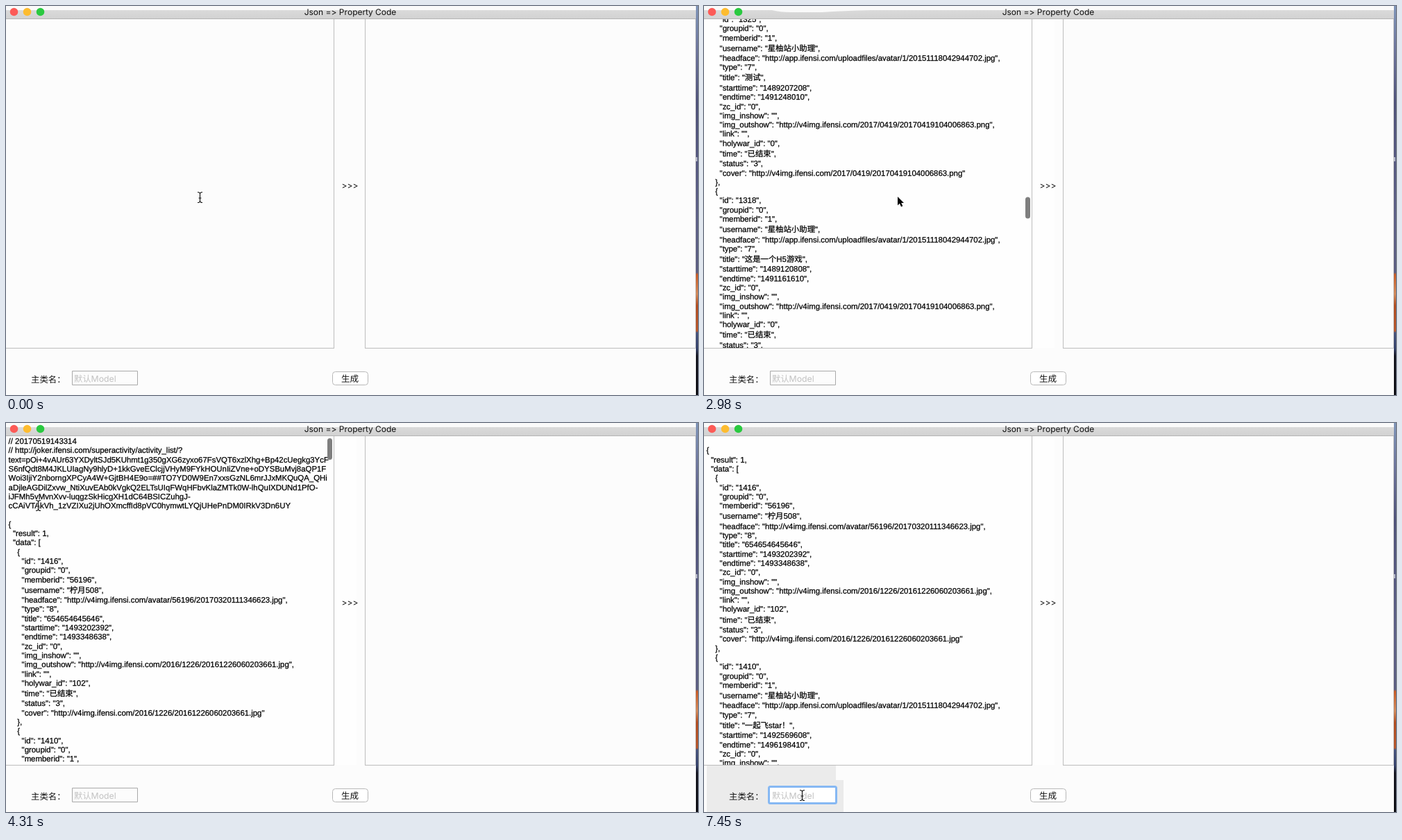
Write an HTML page with a canvas that moves like this. It is 997 px wide and 561 px high and loops after 8 s.

```html
<!DOCTYPE html>
<html lang="zh">
<head>
<meta charset="utf-8">
<title>Json => Property Code</title>
<style>
  html, body { margin: 0; width: 100%; height: 100%; overflow: hidden; background: #fcfcfc; }
  canvas { display: block; font-variant-ligatures: none; font-feature-settings: "calt" 0, "liga" 0; }
</style>
</head>
<body>
<canvas id="stage" width="997" height="561"></canvas>
<script>
const ctx = document.getElementById('stage').getContext('2d');
const LOOP = 8000, TICK = 149;
const LINE = 13.3, WIDE_EXTRA = 2.95, TOP = 20, BOTTOM = 493, LEFT = 3.6;
const HEADER_LINES = 8;
const CODE_FONT = '11.4px "Liberation Sans", "Noto Sans CJK SC", "Noto Sans CJK", sans-serif';
const uiFont = size => `${size}px Inter, "Noto Sans CJK SC", "Noto Sans CJK", sans-serif`;

// ---- Document -----------------------------------------------------------
const IMG = 'http://v4img.ifensi.com/';
const POSTER = IMG + '2017/0419/20170419104006863.png';

function activity(id, o) {
  return {
    id: String(id), groupid: '0', memberid: o.member, username: o.user, headface: o.face,
    type: o.type, title: o.title, starttime: o.start, endtime: o.end, zc_id: '0',
    img_inshow: '', img_outshow: o.image, link: o.link, holywar_id: o.war,
    time: o.time, status: o.status, cover: o.image
  };
}
function focus(title, linkid, image) {
  return {
    id: '1410', type: '7', zc_id: '0', img_outshow: POSTER, title,
    focustype: '40', linkid, focusimage: IMG + '2017/' + image + '.jpg'
  };
}

const helper = {
  member: '1', user: '星柚站小助理',
  face: 'http://app.ifensi.com/uploadfiles/avatar/1/20151118042944702.jpg',
  type: '7', title: '一起飞star！', start: '1492569608', end: '1496198410',
  image: POSTER, link: 'http://h5.ifensi.com/dev/idol/index.php?normal',
  war: '0', time: '12天后结束', status: '2'
};
const data = [
  activity(1416, {
    member: '56196', user: '柠月508', face: IMG + 'avatar/56196/20170320111346623.jpg',
    type: '8', title: '654654645646', start: '1493202392', end: '1493348638',
    image: IMG + '2016/1226/20161226060203661.jpg', link: '', war: '102',
    time: '已结束', status: '3'
  }),
  activity(1410, helper)
];
for (let i = 0; i < 20; i++) {
  data.push(activity(1402 - 7 * i, {
    ...helper, title: i % 2 ? '测试' : '这是一个H5游戏', link: '', time: '已结束', status: '3',
    start: String(1490157608 - i * 86400), end: String(1492198410 - i * 86400)
  }));
}
const GAME = 'http://h5.ifensi.com/dev/lightstar/web-mobile/game';
const focuses = [
  focus('测试', '1402', '0322/20170322030212415'),
  focus('测试', 'http://h5.ifensi.com/dev/wajtc/index.html,1402', '0322/20170322030451198'),
  focus('1111', '1410', '0505/20170505034627951'),
  focus('这是一个H5游戏', GAME + '.html?sid=1001,1400', '0505/20170505034700789'),
  focus('测试', GAME, '0509/20170509043902275')
];
const header = `// 20170519143314
// http://joker.ifensi.com/superactivity/activity_list/?
text=pOi+4vAUr63YXDyltSJd5KUhmt1g350gXG6zyxo67FsVQT6xzlXhg+Bp42cUegkg3YcF
S6nfQdt8M4JKLUIagNy9hlyD+1kkGveEClcjjVHyM9FYkHOUnIiZVne+oDYSBuMvj8aQP1F
Woi3IjiY2nborngXPCyA4W+GjtBH4E9o=##TO7YD0W9En7xxsGzNL6mrJJxMKQuQA_QHi
aDjleAGDilZxvw_NtiXuvEAb0kVgkQ2ELTsUIqFWqHFbvKlaZMTk0W-lhQuIXDUNd1PfO-
iJFMh5vMvnXvv-luqgzSkHicgXH1dC64BSICZuhgJ-
cCAiVTAkVh_1zVZIXu2jUhOXmcffId8pVC0hymwtLYQjUHePnDM0IRkV3Dn6UY

`;

let docHeight = 0;
const lines = (header + JSON.stringify({ result: 1, data, focus: focuses }, null, 2))
  .split('\n').map(text => {
    const wide = /[^\x00-\x7f]/.test(text);
    const line = { text, y: docHeight, baseline: docHeight + 10.1 + (wide ? 1.8 : 0) };
    docHeight += LINE + (wide ? WIDE_EXTRA : 0);
    return line;
  });
const maxScroll = docHeight - (BOTTOM - TOP);

// ---- Timeline, counted in ticks -------------------------------------------
const pointerPath = [
  [0, 279, 276], [20, 279, 276], [22, 227, 261], [25, 227, 261], [29, 46, 119],
  [31, 7, 30], [32, 6, 25], [36, 63, 127], [39, 63, 127], [44, 127, 553],
  [45, 128, 545], [47, 141, 537], [60, 141, 537]
];
function pointerAt(n) {
  const i = pointerPath.findIndex(p => p[0] > n);
  const [t0, x0, y0] = pointerPath[i - 1], [t1, x1, y1] = pointerPath[i];
  const k = (n - t0) / (t1 - t0);
  return { x: Math.round(x0 + (x1 - x0) * k), y: Math.round(y0 + (y1 - y0) * k) };
}
const scrollSteps = [maxScroll - 10, maxScroll * .92, maxScroll * .58, maxScroll * .2, 248, 70, 14];
const scrollAt = n => n < 18 ? maxScroll : scrollSteps[n - 18] || 0;
const within = (n, ...spans) => spans.some(([a, b]) => n >= a && n < b);

// ---- Drawing --------------------------------------------------------------
function rect(color, x, y, w, h) {
  ctx.fillStyle = color;
  ctx.fillRect(x, y, w, h);
}
function label(text, x, y, size, color = '#111', align = 'left') {
  ctx.font = uiFont(size);
  ctx.textAlign = align;
  ctx.fillStyle = color;
  ctx.fillText(text, x, y);
}
// Draws character by character, so that arrows do not turn into ligatures.
function plainLabel(text, centre, y, size) {
  ctx.font = uiFont(size);
  const widths = [...text].map(c => ctx.measureText(c).width);
  let x = centre - widths.reduce((a, b) => a + b) / 2;
  [...text].forEach((c, i) => {
    label(c, x, y, size);
    x += widths[i];
  });
}
function roundBox(x, y, w, h, r, fill, stroke, width = 1) {
  ctx.beginPath();
  ctx.roundRect(x, y, w, h, r);
  ctx.fillStyle = fill;
  ctx.fill();
  if (!stroke) return;
  ctx.strokeStyle = stroke;
  ctx.lineWidth = width;
  ctx.stroke();
}

function drawTitleBar(n) {
  const shade = ctx.createLinearGradient(0, 0, 0, 18);
  shade.addColorStop(0, '#dedede');
  shade.addColorStop(1, '#d2d2d2');
  rect(shade, 0, 0, 994, 18);
  const glare = new Path2D(
    within(n, [1, 18]) ? 'M0 0V6H88Q110 10 140 10T215 12Q228 10 240 6H994V0Z'
    : within(n, [18, 21]) ? 'M0 0V6H98Q110 9 125 9H170Q200 7 240 6H994V0Z'
    : 'M0 0H994V6H0Z');
  ctx.fillStyle = '#fafafa';
  ctx.fill(glare);
  rect('#b4b4b4', 0, 18, 994, 1);
  ['#fc5b57', '#fdbc30', '#2ac940'].forEach((color, i) => {
    ctx.beginPath();
    ctx.arc(11.5 + 19 * i, 8.5, 5.8, 0, 7);
    ctx.fillStyle = color;
    ctx.fill();
  });
  plainLabel('Json => Property Code', 496, 13, 12);
}

function drawDesktopEdge() {
  const edge = ctx.createLinearGradient(0, 0, 0, 561);
  [[0, '#7f95b8'], [.12, '#6b7299'], [.25, '#4d5078'], [.55, '#5c5f86'], [.685, '#5a5c80'],
   [.69, '#c65a25'], [.74, '#d08a5c'], [.77, '#b04c20'], [.835, '#b5562c'], [.84, '#45527c'],
   [.88, '#33406a'], [.9, '#14151f'], [1, '#0c0c12']]
    .forEach(([at, color]) => edge.addColorStop(at, color));
  rect(edge, 994, 0, 3, 561);
  rect('#b9bccb', 994, 218, 2, 6);
}

function drawSelection(pointer) {
  const row = Math.floor((pointer.y - TOP) / LINE);
  rect('#b3d7ff', 3, TOP, 467, row * LINE);
  if (row < HEADER_LINES) rect('#b3d7ff', 3, TOP + row * LINE, pointer.x - 3, LINE);
}

function drawEditor(n, pointer) {
  const trimmed = n >= 37;
  const visible = trimmed ? lines.slice(HEADER_LINES) : lines;
  const scroll = trimmed ? visible[0].y : scrollAt(n);
  ctx.save();
  ctx.beginPath();
  ctx.rect(0, TOP - 1, 472, BOTTOM - TOP + 1);
  ctx.clip();
  if (within(n, [32, 37])) drawSelection(pointer);

  ctx.font = CODE_FONT;
  ctx.textAlign = 'left';
  ctx.fillStyle = ctx.strokeStyle = '#000';
  ctx.lineWidth = .25;
  for (const { text, y, baseline } of visible) {
    const top = y - scroll;
    if (top < -18 || top > 480) continue;
    ctx.fillText(text, LEFT, TOP + baseline - scroll);
    ctx.strokeText(text, LEFT, TOP + baseline - scroll);
  }

  if (within(n, [1, 6], [10, 13], [17, 24])) rect('#000', 7.5, 192 + maxScroll - scroll, 1, 13);
  if (within(n, [37, 41], [44, 47])) rect('#000', 4, 20, 1, 13);

  const barAlpha = within(n, [1, 6], [18, 30]) ? 1 : n === 6 || n === 30 ? .5 : 0;
  if (barAlpha) {
    ctx.globalAlpha = barAlpha;
    roundBox(463, 22 + 437 * scroll / maxScroll, 7, 31, 3.5, '#7f7f7f');
  }
  ctx.restore();
}

function drawForm(n) {
  if (n >= 44) rect('#ebebeb', 4, 494, n < 47 ? 129 : 186, 67);
  if (n >= 48) rect('#ebebeb', 4, 515, 197, 46);
  label('主类名：', 36, 542.5, 12.4);
  if (n >= 47) roundBox(93.5, 524.5, 97, 24, 2, '#fff', '#86b8f3', 3);
  else roundBox(95.5, 526.5, 94, 20, 0, '#fcfcfc', '#a8a8a8');
  label('默认Model', 98, 542, 12.3, '#c2c2c2');
  if (within(n, [47, 50])) rect('#000', 98, 530, 1, 14);
  roundBox(470.5, 527.5, 51, 19, 4, '#fff', '#b8b8b8');
  label('生成', 495.5, 542, 12.6, '#111', 'center');
}

function drawPointer(n, { x, y }) {
  ctx.lineJoin = 'round';
  const arrow = within(n, [1, 21]);
  const shape = new Path2D(arrow
    ? 'M0 0V12.5L2.9 9.8 5 14.6 7.3 13.6 5.2 9H9Z'
    : 'M-3.5-7.5Q0-7.5 0-5Q0-7.5 3.5-7.5M0-5V5M-2 1H2M-3.5 7.5Q0 7.5 0 5Q0 7.5 3.5 7.5');
  ctx.save();
  ctx.translate(arrow ? x : x + .5, arrow ? y - 1 : y);
  ctx.strokeStyle = '#fff';
  ctx.lineWidth = arrow ? 2 : 2.6;
  ctx.stroke(shape);
  if (arrow) {
    ctx.fillStyle = '#000';
    ctx.fill(shape);
  } else {
    ctx.strokeStyle = '#111';
    ctx.lineWidth = 1.2;
    ctx.stroke(shape);
  }
  ctx.restore();
}

function draw(time) {
  const n = Math.floor((time + 11) / TICK);
  const pointer = pointerAt(n);
  ctx.textRendering = 'geometricPrecision';
  rect('#fcfcfc', 0, 0, 997, 561);
  if (n >= 1) rect('#fefefe', 0, 19, 505, 474);
  drawTitleBar(n);
  if (n >= 1) drawEditor(n, pointer);
  rect('#bdbdbd', 472, 19, 1, 475);
  rect('#bdbdbd', 0, 493, 473, 1);
  rect('#bdbdbd', 517, 19, 1, 475);
  rect('#bdbdbd', 517, 493, 477, 1);
  rect('#cccccc', 993, 19, 1, 475);
  plainLabel('>>>', 495.5, 263, 12);
  drawForm(n);
  drawDesktopEdge();
  drawPointer(n, pointer);
}

const start = performance.now();
function loop() {
  draw((performance.now() - start) % LOOP);
  requestAnimationFrame(loop);
}
loop();
</script>
</body>
</html>
```
